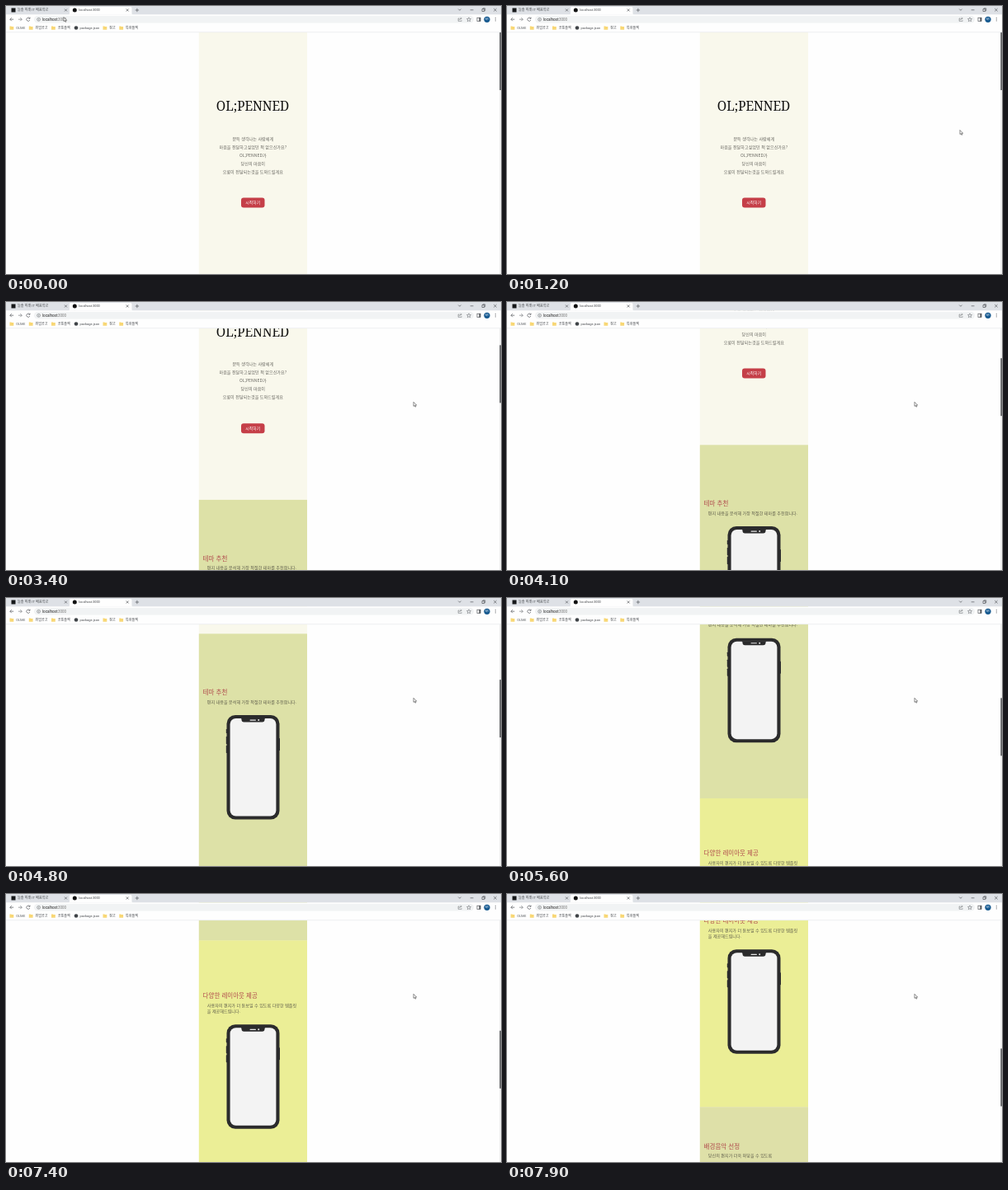
An HTML page for the animation above (8000 ms loop, 600 by 325 pixels).

```html
<!DOCTYPE html>
<html lang="ko">
<head>
<meta charset="utf-8">
<title>Landing page scroll</title>
<style>
  html, body { margin: 0; width: 100%; height: 100%; overflow: hidden; background: #fefefe; }
  svg { display: block; width: 100vw; height: 100vh; }
  text { font-family: "Noto Sans CJK KR", "Noto Sans CJK", "Noto Sans", sans-serif; white-space: pre; }
  .title { font-family: "Noto Serif", serif; }
  .latin { font-family: Roboto, sans-serif; }
  .icon { fill: none; stroke: #55585c; stroke-width: .7; }
</style>
</head>
<body>
<svg id="stage" viewBox="0 0 600 325" preserveAspectRatio="none">
  <rect width="600" height="325" fill="#fefefe"/>
  <g id="page"></g>
  <rect x="598" y="32" width="2" height="293" fill="#f1f1f1"/>
  <rect id="thumb" x="598.3" y="32" width="1.7" height="70" fill="#606164"/>
  <g id="browser">
    <rect width="600" height="10.5" fill="#dee1e6"/>
    <rect y="10.5" width="600" height="21.5" fill="#fefefe"/>
    <path d="M75.5 10.5q1.5 0 1.5-1.5V2.500q0-1.500 1.500-1.500H151q1.500 0 1.500 1.500V9q0 1.500 1.500 1.500z" fill="#fefefe"/>
    <rect x="34" y="12" width="533" height="8.600" rx="4.300" fill="#f1f3f4"/>
    <path d="M0 31.700H600" stroke="#e3e5e8" stroke-width=".6"/>
    <rect x="6.500" y="2.500" width="5" height="5" fill="#16181a"/>
    <circle cx="83.300" cy="5" r="2.500" fill="#111"/>
    <circle cx="85" cy="26.500" r="2.300" fill="#3f4347"/>
    <circle cx="583" cy="16.300" r="3.600" fill="#16598f"/>
    <g class="icon">
      <path d="M71 3.500l3 3m0-3l-3 3M145.700 3.500l3 3m0-3l-3 3M156.700 5h4.400m-2.200-2.200v4.400"/>
      <path d="M548.200 3.600l1.700 1.700 1.700-1.700M562.700 4.800h3.800M577 3.700h2.800v2.800h-2.800zM578 3.700v-.9h2.700v2.800h-.9M591.200 3l3.400 3.400m0-3.400l-3.400 3.400"/>
      <path d="M9.200 16.200H4.800m2-2l-2 2 2 2"/>
      <path d="M14.900 16.200h4.400m-2-2l2 2-2 2" stroke="#777a7e"/>
      <path d="M28.700 15a2.100 2.100 0 1 0 .2 2M29 13.600v1.700h-1.700"/>
      <circle cx="39.600" cy="16.300" r="1.900" stroke-width=".5"/>
      <path d="M39.600 16v1.300m0-2.100v.4" stroke-width=".5"/>
      <path d="M549.600 15h-1.400v3.300h4v-1M549.500 17q.3-2 2.500-2m-1-1.300l1.300 1.300-1.300 1.300" stroke-width=".5"/>
      <path d="M561 13.800l.7 1.600 1.800.2-1.300 1.200.4 1.800-1.600-.9-1.600.9.400-1.800-1.300-1.200 1.800-.2z" stroke-width=".5"/>
      <rect x="571" y="14.200" width="4.100" height="4.100"/>
      <path d="M574.200 14v4.500" stroke-width="1.600"/>
      <path d="M593.300 14.100v.9m0 .8v.9m0 .8v.9" stroke-width=".9"/>
    </g>
  </g>
  <path id="cursor" d="M0 0V5.100L1.200 4.100 2 5.900 2.900 5.500 2.100 3.800H3.700Z" fill="#fff" stroke="#333" stroke-width=".55"/>
</svg>
<script>
const LOOP = 8000, STEP = 100, TOP = 32, VIEW = 293;
const byId = id => document.getElementById(id);
const page = byId("page"), browser = byId("browser");

function add(parent, tag, attrs, content) {
  const node = document.createElementNS("http://www.w3.org/2000/svg", tag);
  for (const key in attrs) node.setAttribute(key, attrs[key]);
  if (content) node.textContent = content;
  parent.append(node);
  return node;
}

const box = (x, y, width, height, fill, rx = 0) =>
  add(page, "rect", { x, y, width, height, fill, rx });

// y is the middle of the line
function label(parent, content, x, y, size, fill, more = {}) {
  add(parent, "text", { x, y: y + size * .36, "font-size": size, fill, ...more }, content);
}

const centered = { "text-anchor": "middle" };

function phone(y) {
  const dark = "#2b2b2c";
  for (const [dy, h] of [[17, 5], [26, 9], [37, 9]]) box(266.8, y + dy, 2, h, dark, .6);
  box(330, y + 28, 2, 15, dark, .6);
  box(267.5, y, 64, 126.600, dark, 10.5);
  box(271.6, y + 4, 55.800, 118.500, "#f3f3f3", 7);
  add(page, "path", { d: `M284 ${y + 3.5}h31q-1.500 0-1.500 2 0 3-3 3h-22q-3 0-3-3 0-2-1.500-2z`, fill: dark });
  box(295.5, y + 5.500, 7.5, 1.2, "#e8e8e8", .6);
  add(page, "circle", { cx: 306.2, cy: y + 6.100, r: 1, fill: "#e8e8e8" });
}

function feature(heading, headY, lines, lineY, phoneY) {
  label(page, heading, 238.6, headY, 7.5, "#b04a4c");
  lines.forEach((line, i) => label(page, line, 243.8, lineY + i * 7.4, 5.1, "#605f4c"));
  if (phoneY) phone(phoneY);
}

function buildPage() {
  ["#f9f8ec", "#dde1a7", "#ebee96", "#dee0a8"].forEach((fill, i) =>
    box(233.8, TOP + i * VIEW + (i ? .3 : 0), 131.2, VIEW + .3, fill));

  label(page, "OL;PENNED", 299, 121.700, 15.4, "#111", { ...centered, class: "title" });
  ["문득 생각나는 사람에게", "마음을 전달하고싶었던 적 없으신가요?", "OL;PENNED가",
    "당신의 마음이", "오롯이 전달되는것을 도와드릴게요"].forEach((line, i) =>
    label(page, line, 299.3, 161 + i * 10, 5.1, "#66655f", centered));
  box(285, 232.600, 28.5, 12, "#c53f48", 3);
  label(page, "시작하기", 299.2, 238.400, 4.9, "#fff", { ...centered, "font-weight": 500 });

  feature("테마 추천", 396.3, ["편지 내용을 분석해 가장 적절한 테마를 추천합니다."], 407.8, 424);
  feature("다양한 레이아웃 제공", 685,
    ["사용자의 편지가 더 돋보일 수 있도록 다양한 템플릿", "을 제공해드립니다."], 696.7, 720.200);
  feature("배경음악 선정", 959, ["당신의 편지가 더욱 와닿을 수 있도록"], 970);
}

function buildBrowser() {
  const ink = "#45484c", latin = { class: "latin" };
  label(browser, "늘솔 미래 IT 배움학교", 14, 5, 4.1, ink);
  label(browser, "localhost:3000", 88.2, 5, 3.9, ink, latin);
  label(browser, "localhost", 44, 16.300, 4.5, "#222", latin);
  label(browser, ":3000", 61.8, 16.300, 4.5, "#777", latin);
  label(browser, "MY", 583, 16.300, 2.8, "#dcecf8", { ...latin, ...centered });
  label(browser, "package.json", 89.5, 26.300, 4, ink, latin);
  const folders = [[4.5, "OLSAE"], [27.800, "취업공고"], [55, "공통플젝"], [117.5, "참고"], [137.3, "특화플젝"]];
  for (const [x, name] of folders) {
    add(browser, "path", { d: `M${x} 24.400h1.800l.6.700h2.400v3.600h-4.800z`, fill: "#f8d775" });
    label(browser, name, x + 7.800, 26.300, name === "OLSAE" ? 3.6 : 4.05, ink);
  }
}

// Keys are [time, value]; a monotone cubic joins them.
function curve(keys) {
  const slope = keys.slice(1).map((k, i) => (k[1] - keys[i][1]) / (k[0] - keys[i][0]));
  const tangent = keys.map((_, i) => {
    const a = slope[i - 1], b = slope[i];
    return a * b > 0 ? 2 * a * b / (a + b) : 0;
  });
  return t => {
    let i = keys.findIndex(k => k[0] > t) - 1;
    if (i === -2) return keys[keys.length - 1][1];
    i = Math.max(i, 0);
    const [t0, v0] = keys[i], [t1, v1] = keys[i + 1];
    const d = t1 - t0, u = (t - t0) / d, w = 1 - u;
    return v0 * (1 + 2 * u) * w * w + tangent[i] * d * u * w * w
      + v1 * u * u * (3 - 2 * u) - tangent[i + 1] * d * u * u * w;
  };
}

const scrollAt = curve([[2900, 0], [3700, 125], [3800, 125], [4100, 152], [4700, 281], [4800, 282],
  [5000, 282], [5900, 408], [6100, 408], [6300, 433], [7000, 531], [7400, 562], [7900, 653]]);
const cursorX = curve([[200, 70], [1100, 551], [1200, 549], [1900, 549], [2000, 517], [2100, 517], [2500, 494]]);
const cursorY = curve([[200, 13.5], [1100, 150.5], [1900, 150.5], [2000, 122], [2100, 122], [2500, 121.3]]);

function draw(time) {
  const t = Math.floor(time % LOOP / STEP) * STEP;
  const scroll = scrollAt(Math.max(t, 2900));
  const c = Math.max(t, 200);
  page.setAttribute("transform", `translate(0 ${-scroll})`);
  byId("thumb").setAttribute("y", TOP + scroll * .238);
  byId("cursor").setAttribute("transform", `translate(${cursorX(c)} ${cursorY(c)})`);
}

buildPage();
buildBrowser();
const start = performance.now();
function tick() {
  draw(performance.now() - start);
  requestAnimationFrame(tick);
}
tick();
</script>
</body>
</html>
```
